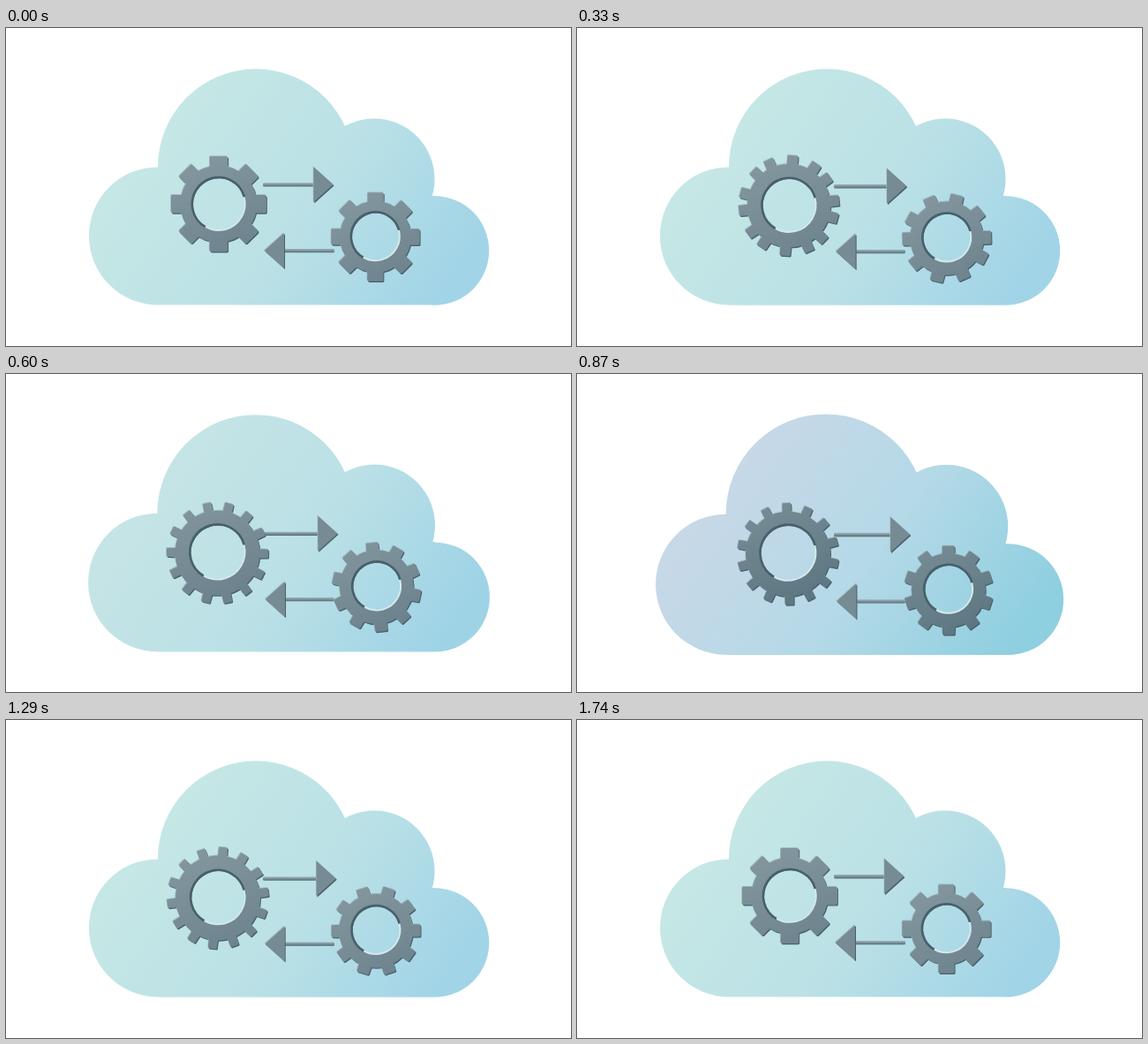
An HTML page with a canvas for the animation above (1.77 s loop, 640 by 360 pixels).

```html
<!DOCTYPE html>
<html lang="en">
<head>
<meta charset="utf-8">
<title>Cloud sync</title>
<style>
html, body { margin: 0; width: 640px; height: 360px; overflow: hidden; background: #fff; }
canvas { display: block; width: 640px; height: 360px; }
</style>
</head>
<body>
<canvas id="stage" width="640" height="360"></canvas>
<script>
const ctx = document.getElementById('stage').getContext('2d');
const STEP = 30, COUNT = 59, APEX = 28;
const TAU = Math.PI * 2, RAD = Math.PI / 180;
const DARK = '#47606b', LIGHT = '#a3b9c0';

// Centre and radius of each lobe
const LOBES = [[172, 235.4, 78], [283, 157.3, 111], [417, 171, 68.5], [485.5, 252, 61.7]];
const DAY = [[197, 231, 229], [187, 225, 230], [161, 212, 231]];
const DUSK = [[199, 216, 231], [180, 217, 231], [142, 207, 224]];

const mix = (a, b, u) => a + (b - a) * u;
const blend = (a, b, u) => `rgb(${a.map((x, i) => Math.round(mix(x, b[i], u)))})`;
const ramp = (x, from, to) => Math.min(1, Math.max(0, (x - from) / (to - from)));
const ease = x => (1 - Math.cos(Math.PI * x)) / 2;

function gradient(x0, y0, x1, y1, colors) {
  const g = ctx.createLinearGradient(x0, y0, x1, y1);
  colors.forEach((c, i) => g.addColorStop(i / (colors.length - 1), c));
  return g;
}

// The cloud swells and cools only near the far end of the path.
function drawCloud(late) {
  const scale = 1 + 0.02 * late;
  ctx.save();
  ctx.translate(345, 90);
  ctx.scale(scale, scale);
  ctx.translate(-345, -90);
  ctx.fillStyle = gradient(195, 90, 495, 300, DAY.map((c, i) => blend(c, DUSK[i], late)));
  ctx.beginPath();
  for (const [x, y, r] of LOBES) {
    ctx.moveTo(x + r, y);
    ctx.arc(x, y, r, 0, TAU);
  }
  ctx.rect(172, 190, 313.5, 123.6);
  ctx.fill();
  ctx.restore();
}

function bevel(shape, fill) {
  for (const [shift, style] of [[1.2, DARK], [-0.8, LIGHT], [0, fill]]) {
    ctx.save();
    ctx.translate(shift * 0.8, shift);
    ctx.fillStyle = style;
    ctx.fill(shape);
    ctx.restore();
  }
}

function drawArrow(start, base, length, y) {
  ctx.fillStyle = gradient(0, y - 2, 0, y + 2.5, ['#9bb0b8', '#7b9099', '#4b636e']);
  ctx.beginPath();
  ctx.roundRect(Math.min(start, base), y - 2, Math.abs(base - start) + 1, 4.3, 1.5);
  ctx.fill();
  const head = new Path2D();
  head.moveTo(base, y - 20);
  head.lineTo(base + length, y);
  head.lineTo(base, y + 20);
  head.closePath();
  bevel(head, '#768b94');
}

// Teeth start bunched in eight places and part into an even ring.
function drawGear({ x, y, outer, root, tip, hole, lift, teeth, turn, split, late }) {
  const shape = new Path2D();
  const hy = y - lift;
  shape.arc(x, y, root, 0, TAU);
  shape.closePath();
  shape.moveTo(x + hole, hy);
  shape.arc(x, hy, hole, 0, TAU, true);
  shape.closePath();
  for (let i = 0; i < teeth; i++) {
    const bunched = Math.round(i * 8 / teeth) * 45;
    const mid = mix(bunched, i * 360 / teeth, split) + turn - 90;
    const corners = [[-1.3, root - 2], [-1, outer - 0.8], [-0.85, outer],
                     [0.85, outer], [1, outer - 0.8], [1.3, root - 2]];
    corners.forEach(([side, r], k) => {
      const a = (mid + side * tip) * RAD;
      shape[k ? 'lineTo' : 'moveTo'](x + r * Math.cos(a), y + r * Math.sin(a));
    });
    shape.closePath();
  }
  const top = blend([132, 151, 159], [119, 140, 149], late);
  const bottom = blend([109, 131, 141], [91, 117, 128], late);
  bevel(shape, gradient(x - 25, y - outer, x + 25, y + outer, [top, bottom]));

  const rim = (r, from, to, color, width) => {
    ctx.beginPath();
    ctx.arc(x, hy, r, from * RAD, to * RAD);
    ctx.strokeStyle = color;
    ctx.lineWidth = width;
    ctx.stroke();
  };
  rim(hole, 120, 345, DARK, 2.6);
  rim(hole - 0.3, -15, 120, '#d3e9ec', 2);
}

function render(now) {
  const k = Math.floor(now / STEP) % COUNT;
  const d = Math.abs(k - APEX);
  const s = 1 - 2 * Math.min(d, COUNT - d) / COUNT;  // there and back, 0 to 1
  const s2 = s * s, late = 1.2 * s ** 6;
  const split = ramp(s, 0.12, 0.49);

  ctx.clearRect(0, 0, 640, 360);
  drawCloud(late);
  drawArrow(291, 348 + 7.3 * s, 22.3, 177 + 5 * s);
  drawArrow(371, 315 + 1.5 * s, -22.3, 252 + 5.7 * s2);
  drawGear({
    x: 241 - 2 * s, y: 199 + 5 * s,
    outer: mix(54.7, 57.8, split), root: mix(43.5, 48, split), tip: mix(11, 5, split),
    hole: 30 + 1.7 * s, lift: 1.5 * s,
    teeth: 14, turn: s2 * 360 / 14, split, late
  });
  drawGear({
    x: 418.5 + 2.5 * s2, y: 236.5 + 9 * s2,
    outer: 50.8, root: mix(40.5, 42, split), tip: mix(10.5, 8, split),
    hole: 27.6, lift: 0.5 + s,
    teeth: 10, turn: ease(s) * 36, split, late
  });
}

let origin = null;
function tick(now) {
  if (origin === null) origin = now;
  render(Math.max(0, now - origin));
  requestAnimationFrame(tick);
}
render(0);
requestAnimationFrame(tick);
</script>
</body>
</html>
```
